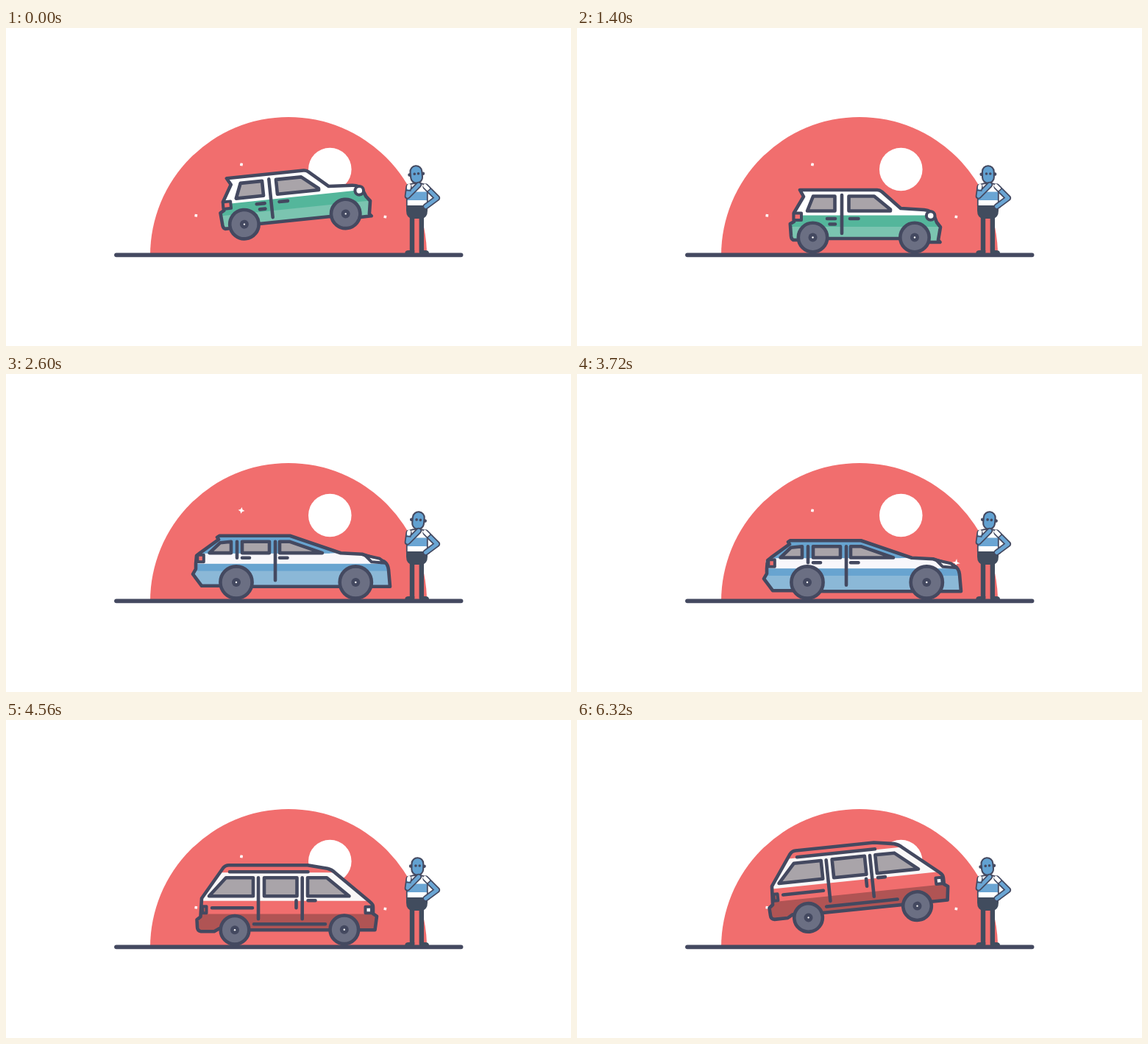
Write an HTML page that moves like this. It is 768x432 px and loops after 6.36 s.

```html
<!DOCTYPE html>
<html lang="en">
<head>
<meta charset="utf-8">
<title>Bouncing cars</title>
<style>
  html, body { margin: 0; width: 100%; height: 100%; overflow: hidden; background: #fff; }
  svg { display: block; width: 100vw; height: 100vh; }
  .ink { fill: none; stroke: #444960; stroke-width: 4.6; stroke-linecap: round; stroke-linejoin: round; }
  .glass { fill: #a9a4a9; }
</style>
</head>
<body>
<svg viewBox="0 0 768 432">
  <path d="M196 309a188 188 0 0 1 376 0z" fill="#f16e6e"/>
  <circle cx="440.3" cy="192" r="29.3" fill="#fff"/>
  <g id="sparkles" fill="#fff"></g>
  <path d="M150 308.3H618.5" class="ink" style="stroke-width:5.8"/>
  <g id="cars"></g>

  <g id="person" stroke-linecap="round" stroke-linejoin="round">
    <path d="M552 250V304M564.8 250V304" stroke="#414c5e" stroke-width="6.4"/>
    <path d="M542.3 306q0-4 5-4h8v4zM575 306q0-4-5-4h-8v4z" fill="#414c5e"/>
    <path d="M545 215q5-4 14-4t14 4v32h-28z" fill="#fff"/>
    <path d="M545 222.5h28v11.5h-28z" fill="#6aa5d3"/>
    <path d="M544 241h29v7q0 11-10 11h-9q-10 0-10-11z" fill="#414c5e"/>
    <path d="M544.8 242V216q2-5 14-5t14 5v28" fill="none" stroke="#444960" stroke-width="1.8"/>
    <g id="head" stroke="#444960">
      <circle cx="549.8" cy="198.6" r="1.7" fill="#444960"/>
      <circle cx="568.4" cy="198.6" r="1.7" fill="#444960"/>
      <rect x="551.2" y="187.2" width="15.8" height="23.4" rx="7.8" fill="#62a1d1" stroke-width="2.1"/>
      <g fill="#444960" stroke="none"><circle cx="556.7" cy="198" r="1.8"/><circle cx="562" cy="198" r="1.8"/></g>
    </g>
    <g fill="none">
      <path id="armR" d="M570.5 215.5L586 231L570.5 242.5" stroke="#444960" stroke-width="8.4"/>
      <path d="M570.5 215.5L586 231L570.5 242.5" stroke="#6aa5d3" stroke-width="4.8"/>
      <path d="M569.5 214.5L573.5 218.6" stroke="#fff" stroke-width="5"/>
      <path d="M573 222L577 218.5" stroke="#444960" stroke-width="1.6"/>
      <path d="M547.5 216L545.8 228.4L561 213" stroke="#444960" stroke-width="8.2"/>
      <path d="M547.5 216L545.8 228.4L561 213" stroke="#6aa5d3" stroke-width="4.8"/>
      <path d="M547.8 214.5L547.4 217" stroke="#fff" stroke-width="5"/>
      <path d="M544.5 220.5L550 221" stroke="#444960" stroke-width="1.6"/>
    </g>
  </g>
</svg>

<script>
const LOOP = 6360, TURN = LOOP / 3, STEP = 40;
const $ = id => document.getElementById(id);

// bands: [top, colour] from roof to sill; raise: body offset at rest
const cars = [
  {
    raise: 0,
    outline: 'M303 220H408Q411.500 220 414.500 222.500L440 245L472 247Q482 248 485 254L489 264L494 270.500L491 288L493.500 291H478L438 286H341L300 288H294Q291.500 287 291 283L289.800 266L295 263V251L308 229Z',
    bands: [[210, '#fff'], [254.500, '#54b69b'], [270, '#7bc4b0']],
    glass: 'M321 228.500H350.500V248.500H313ZM369.500 228.500H404L426 246.500V248.500H369.500Z',
    lines: 'M360 227V279M340 259H351M343.500 266.500H351M371 259H382.500',
    lamps: '<rect x="294.500" y="251.500" width="10.500" height="9.500" fill="#f16e6e"/><circle cx="480.700" cy="255" r="5.800" fill="#fff"/>',
    wheels: [[320.5, 284.5], [459, 284.5]], radius: 19.7
  },
  {
    raise: -4.8,
    outline: 'M287 228L290 226H386L455 249.500L484 251L514 261Q519 264 520 272L522 295H496L453 295H336L290 294H266L254 278L258 271V264L259 253L264 249L289 231Z',
    bands: [[210, '#68a4d0'], [250, '#f8f7fb'], [264, '#68a4d0'], [273.800, '#8bb8d7']],
    extra: '<path d="M440 250L455 249L490 251V256H440Z" fill="#f8f7fb"/>',
    glass: 'M276.500 249.300L291 235.500L306 234V249.300ZM321 234H358V249.300H321ZM372 234H386L430 249.300H372Z',
    lines: 'M314 234V256M366 234V286.500M321 256H331M372 256H382.500',
    lamps: '<rect x="260.300" y="252" width="8.500" height="9.500" fill="#f16e6e"/><path d="M488 252.500L508 257L516 263L497 261.500Z" fill="#fff"/>',
    wheels: [[313, 283], [475.3, 283]], radius: 21.6
  },
  {
    raise: 0,
    outline: 'M266 238L295 197Q298 193 303 193H410L437 197.500Q443 199 447 203L495 243Q499 246 499 250V259L504 262.500L501.500 281H482L440 281H331L290 279L283 283H265Q260 282 260 277L259.500 267L264.500 263Z',
    bands: [[180, '#f16e6e'], [203, '#f9f7f7'], [241.500, '#f16e6e'], [259.300, '#b05454']],
    glass: 'M276 235L299 210H336V235ZM351 210H395.500V235H351ZM410 210H436L466.500 235H410Z',
    lines: 'M304 202H410.500M343 210V266M402.700 210V266M280 251H335M337 273H434M394.500 241V251M410.500 241H420.500',
    lamps: '<rect x="267" y="249" width="5.500" height="9" fill="#b05454"/><rect x="488.500" y="249.500" width="8.500" height="8.500" fill="#fff"/>',
    wheels: [[311, 285.3], [459.8, 284.8]], radius: 19.3
  }
];

const wheel = ([x, y], r) => `
  <circle cx="${x}" cy="${y}" r="${r}" class="ink" style="fill:#6b6f83"/>
  <circle cx="${x}" cy="${y}" r="6" fill="#444960"/>
  <circle cx="${x}" cy="${y}" r="1.2" fill="#fff"/>`;

$('cars').innerHTML = cars.map((c, i) => `
  <g id="car${i}">
    <g id="body${i}">
      <clipPath id="clip${i}"><path d="${c.outline}"/></clipPath>
      <g clip-path="url(#clip${i})">
        ${c.bands.map(([y, fill]) => `<rect x="240" y="${y}" width="300" height="130" fill="${fill}"/>`).join('')}
        ${c.extra || ''}
      </g>
      <path d="${c.glass}" class="ink glass" style="fill:#a9a4a9"/>
      <path d="${c.outline}" class="ink"/>
      <path d="${c.lines}" class="ink"/>
      <g stroke="#444960" stroke-width="4" stroke-linejoin="round">${c.lamps}</g>
    </g>
    ${c.wheels.map(w => wheel(w, c.radius)).join('')}
  </g>`).join('');

const sparkles = [
  { x: 320, y: 185.4, starts: [2520, 5110] },
  { x: 258.3, y: 254.7, starts: [330] },
  { x: 515.4, y: 256.5, starts: [1740, 3130] }
];
const TWINKLE = 760;
$('sparkles').innerHTML = sparkles.map(s =>
  `<path transform="translate(${s.x} ${s.y}) rotate(8)"/>`).join('');

const clamp = v => Math.max(0, Math.min(1, v));
const smooth = u => u * u * (3 - 2 * u);

// Smoothly interpolated [time, value] keys
function keyed(keys, t) {
  const i = keys.findIndex(k => k[0] > t);
  if (i < 0) return keys[keys.length - 1][1];
  const [t0, a] = keys[i - 1], [t1, b] = keys[i];
  return a + (b - a) * smooth((t - t0) / (t1 - t0));
}

const SQUAT = [[0, 0], [260, 0], [340, 5], [480, -1.4], [620, 0], [1520, 0], [1600, 5], [1690, 0]];

function lift(t) {
  if (t < 300) return 1 - (t / 300) ** 2;
  return 1 - (1 - clamp((t - 1630) / 440)) ** 3;
}

// Small square at 0, four-pointed star at 1
function starPath(k) {
  const tip = 1.8 + 4.7 * k, notch = 2.5 - 0.9 * k;
  let d = '';
  for (let i = 0; i < 8; i++) {
    const r = i % 2 ? notch : tip, a = i * Math.PI / 4;
    d += `${i ? 'L' : 'M'}${r * Math.cos(a)} ${r * Math.sin(a)}`;
  }
  return d + 'Z';
}

function draw(t) {
  const active = Math.floor(t / TURN), local = t % TURN;
  const up = lift(local), squat = keyed(SQUAT, local);
  cars.forEach((c, i) => {
    const car = $('car' + i);
    car.style.display = i === active ? '' : 'none';
    car.setAttribute('transform', `translate(${3 * up} ${-25 * up}) rotate(${-5.9 * up} 390 284)`);
    $('body' + i).setAttribute('transform', `translate(0 ${c.raise + squat})`);
  });

  const sway = Math.cos(2 * Math.PI * (t + 100) / LOOP);
  $('head').setAttribute('transform', `rotate(${-5.5 * Math.sin(sway * Math.PI / 2)} 559 213)`);

  sparkles.forEach((s, i) => {
    const start = s.starts.find(a => t >= a && t < a + TWINKLE);
    const k = start === undefined ? 0 : Math.sqrt(Math.sin(Math.PI * (t - start) / TWINKLE));
    $('sparkles').children[i].setAttribute('d', starPath(k));
  });
}

const began = performance.now();
function tick() {
  const t = Math.max(0, performance.now() - began) % LOOP;
  draw(Math.floor(t / STEP) * STEP);
  requestAnimationFrame(tick);
}
tick();
</script>
</body>
</html>
```
